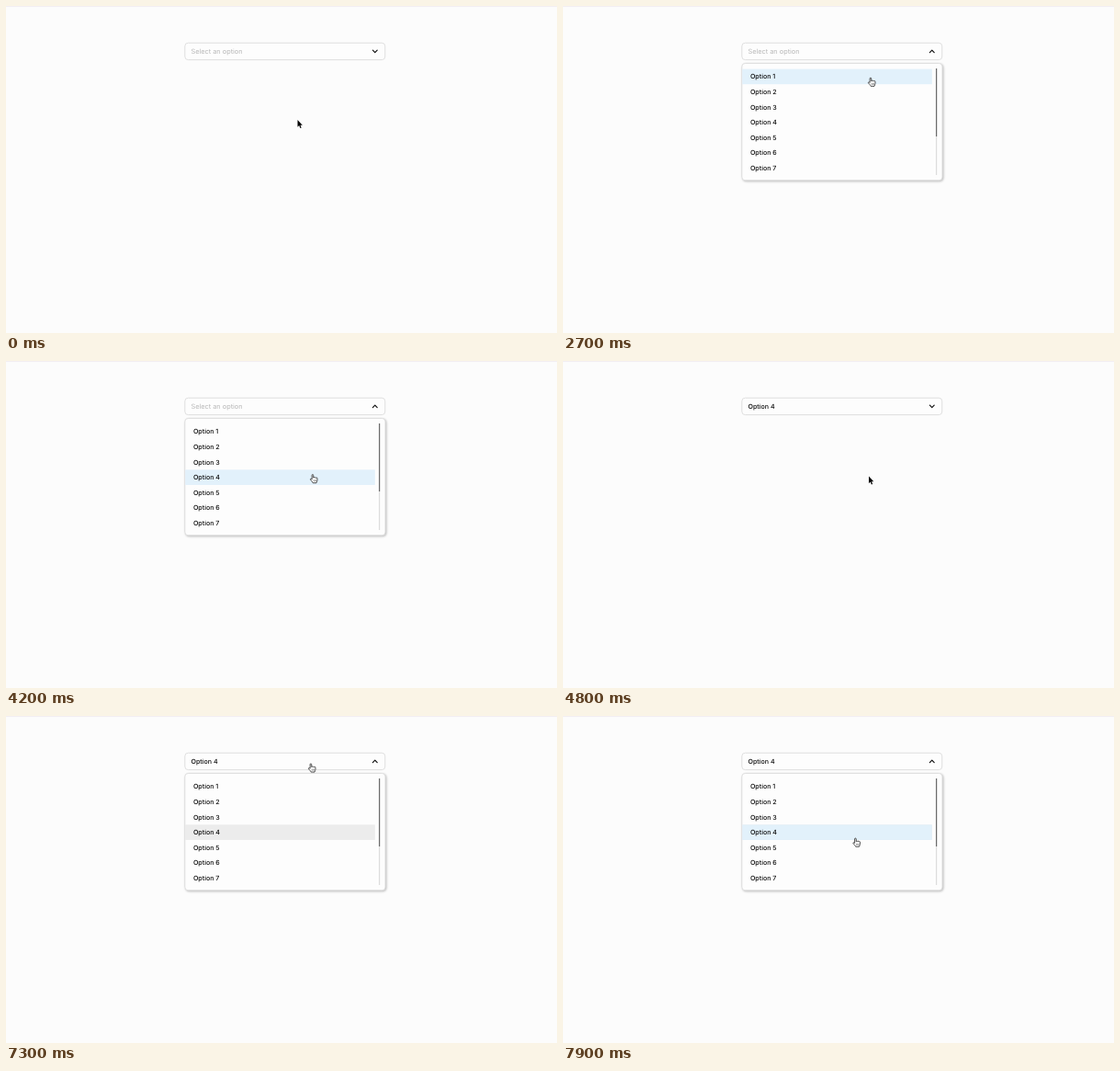
Write an HTML page that moves like this. It is 600 px wide and 356 px high and loops after 8000 ms.

```html
<!DOCTYPE html>
<html lang="en">
<head>
<meta charset="utf-8">
<title>Select menu</title>
<style>
  html, body { margin: 0; width: 100%; height: 100%; overflow: hidden; background: #fcfcfc; }
  svg { display: block; width: 600px; height: 356px; }
  text { font: 500 7.1px Inter, "Liberation Sans", sans-serif; fill: #0c0c0c; text-rendering: geometricPrecision; }
  .hint { font-weight: 400; font-size: 7.35px; fill: #b9b9b9; }
  .box { fill: #fdfdfd; stroke: #dcdcdc; stroke-width: .9; }
  .panel { filter: drop-shadow(1.1px 1.1px .8px rgba(0, 0, 0, .25)); }
  .chevron { fill: none; stroke: #111; stroke-width: 1.2; stroke-linecap: round; stroke-linejoin: round; }
  .arrow { fill: #050505; stroke: #fff; stroke-width: .6; paint-order: stroke; }
  .hand { fill: #fff; stroke: #222; stroke-width: .75; stroke-linejoin: round; }
</style>
</head>
<body>
<svg viewBox="0 0 600 356">
  <rect width="600" height="356" fill="#fcfcfc"/>
  <rect width="600" height="1" fill="#f2eef2"/>

  <rect class="box" x="194.8" y="40.2" width="218" height="18.4" rx="3.6"/>
  <text id="label" class="hint" x="201.5" y="52.1">Select an option</text>
  <path id="chevron" class="chevron" d="M399.4 48.2l2.4 2.4l2.4-2.4"/>

  <g id="menu" visibility="hidden">
    <rect class="box panel" x="194.8" y="62.4" width="218.2" height="127.4" rx="3.6"/>
    <rect id="chosen" x="195.2" width="206.6" height="16.6" fill="#ececec"/>
    <rect id="hover" x="195.2" width="206.6" height="16.6" fill="#e2f1fb"/>
    <g id="options"></g>
    <rect x="406" y="68" width="1.2" height="116" fill="#dcdcdc"/>
    <rect x="406" y="68" width="1.2" height="74" fill="#6a6a6a"/>
  </g>

  <g id="cursor" transform="translate(317.5 124)">
    <path id="arrow" class="arrow" d="M0 0V7.7L1.7 6.1L2.9 8.9L4.2 8.4L3 5.7H5.3Z"/>
    <g id="hand" class="hand" transform="translate(-3.2 -.5) scale(1.06)" visibility="hidden">
      <path d="M2.2 5.6V1.3a.75 .75 0 0 1 1.5 0V3.9c0-.7 1.3-.7 1.4 0c.1-.6 1.3-.5 1.4 .2c.2-.5 1.2-.4 1.2 .4V6.5c0 1-.7 1.6-.9 2.7H3.2C2.9 8 1.5 7.2 .7 5.8c-.4-.8 .5-1.3 1.5-.2z"/>
      <path d="M4.1 6v1.8M5.2 6v1.8M6.3 6v1.8" stroke-width=".4"/>
    </g>
  </g>
</svg>

<script>
const LOOP = 8000, TICK = 100;
const ROW_TOP = 68.6, ROW = 16.58, PICK = 3;
const OPENS = 1000, PICKS = 4800, REOPENS = 7200;

// The pointer rests between moves; each eases from where the last one ended.
const origin = { x: 317.5, y: 124 };
const moves = [
  { start: 0, end: 400, x: 336, y: 52.6 },
  { start: 1800, end: 2400, x: 335, y: 75.5 },
  { start: 2600, end: 3000, x: 335, y: 92 },
  { start: 3400, end: 3500, x: 333.8, y: 102 },
  { start: 3500, end: 3700, x: 335, y: 121.5 },
  { start: 4100, end: 4300, x: 333, y: 125.5 },
  { start: 5800, end: 6700, x: 332, y: 51.8 },
  { start: 7400, end: 7700, x: 329, y: 90.3 },
  { start: 7700, end: 7900, x: 318.5, y: 133 }
];

const el = id => document.getElementById(id);
const show = (id, on) => el(id).setAttribute("visibility", on ? "inherit" : "hidden");
const rowY = i => ROW_TOP + ROW * i;
const ease = k => k * k * (3 - 2 * k);

for (let i = 0; i < 7; i++) {
  const text = document.createElementNS("http://www.w3.org/2000/svg", "text");
  text.setAttribute("x", 203.9);
  text.setAttribute("y", rowY(i) + 10.8);
  text.textContent = "Option " + (i + 1);
  el("options").append(text);
}
el("chosen").setAttribute("y", rowY(PICK));

function pointerAt(t) {
  let { x, y } = origin;
  for (const move of moves) {
    if (t <= move.start) break;
    const k = ease(Math.min((t - move.start) / (move.end - move.start), 1));
    x += (move.x - x) * k;
    y += (move.y - y) * k;
  }
  return { x, y };
}

function draw(now) {
  const t = Math.floor((now % LOOP) / TICK) * TICK;
  const { x, y } = pointerAt(t);
  const open = (t >= OPENS && t < PICKS) || t >= REOPENS;
  const picked = t >= PICKS;
  // A row keeps its highlight until the tip is clearly past its edge.
  const row = open ? Math.floor((y - ROW_TOP - .5) / ROW) : -1;
  const onSelect = y > 40 && y < 59;
  const hand = onSelect || row >= 0;

  el("label").textContent = picked ? "Option " + (PICK + 1) : "Select an option";
  el("label").setAttribute("class", picked ? "" : "hint");
  el("chevron").setAttribute("transform", open ? "rotate(180 401.8 49.4)" : "");
  el("menu").setAttribute("visibility", open ? "visible" : "hidden");
  show("chosen", picked);
  show("hover", row >= 0);
  el("hover").setAttribute("y", rowY(Math.max(row, 0)));
  el("cursor").setAttribute("transform", `translate(${x} ${y})`);
  show("hand", hand);
  show("arrow", !hand);
}

function frame() {
  draw(performance.now());
  requestAnimationFrame(frame);
}
frame();
</script>
</body>
</html>
```
